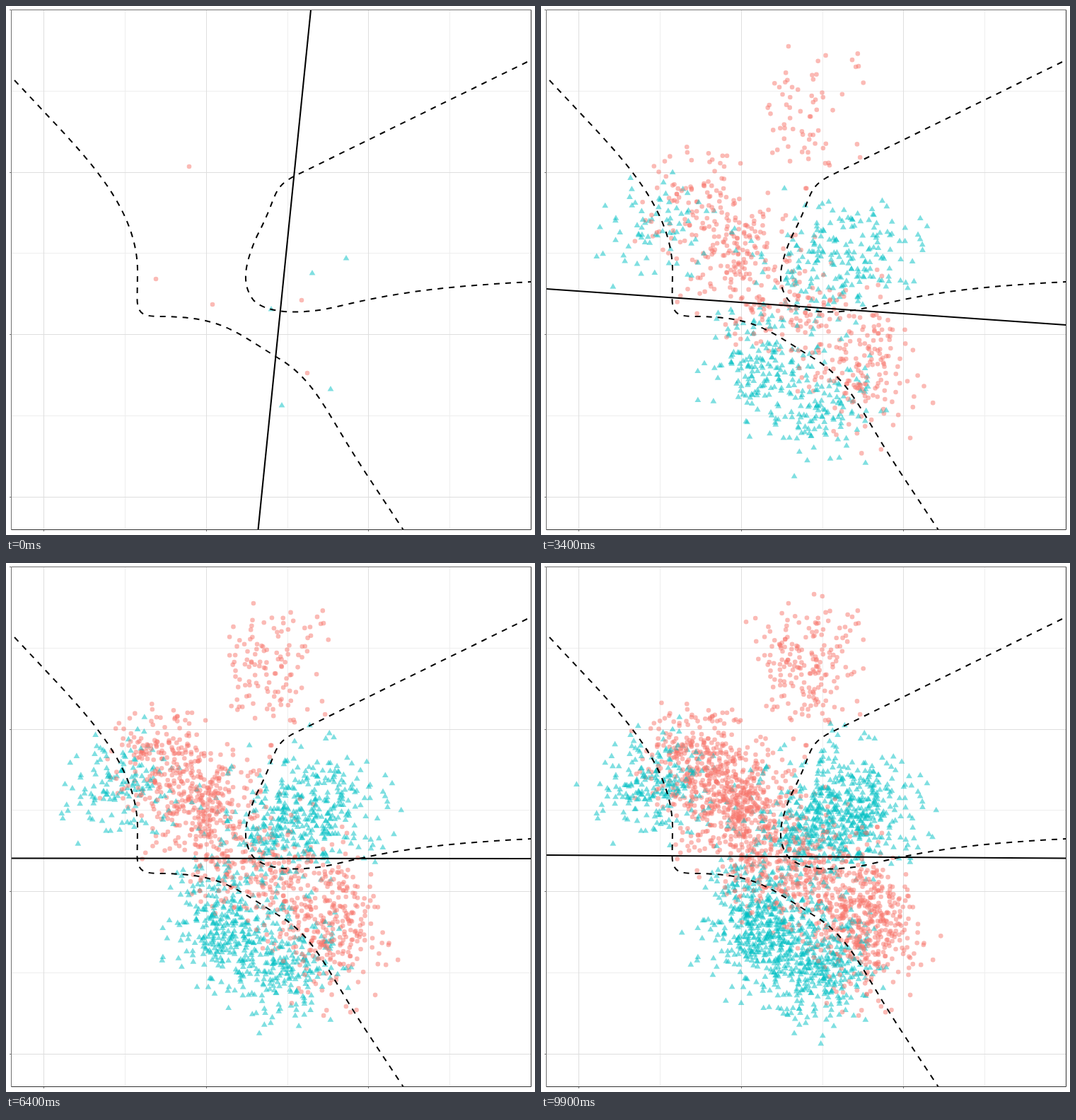
An HTML page with a canvas for the animation above (10 s loop, 748 by 748 pixels).

```html
<!DOCTYPE html>
<html lang="en">
<head>
<meta charset="utf-8">
<title>Growing sample and decision boundaries</title>
<style>
  html, body { margin: 0; width: 100%; height: 100%; overflow: hidden; background: #fff; }
  canvas { display: block; width: 748px; height: 748px; }
</style>
</head>
<body>
<canvas id="plot" width="748" height="748"></canvas>
<script>
const ctx = document.getElementById('plot').getContext('2d');
const STEPS = 100, STEP_MS = 100, PER_STEP = 34, MAX_SPREAD = 2.8;
const LEFT = 7.5, TOP = 5.5, RIGHT = 742.5, BOTTOM = 740.5;
const RED = 'rgba(248,118,109,0.5)', TEAL = 'rgba(0,191,196,0.5)';

// Normal clusters: centre x, y, spread x, y, share
const clusters = [
  [drawCircle, 372, 143, 36, 41, 0.06],
  [drawCircle, 217, 278, 35, 38, 0.10],
  [drawCircle, 285, 343, 43, 42, 0.165],
  [drawCircle, 365, 437, 48, 40, 0.115],
  [drawCircle, 460, 508, 38, 48, 0.13],
  [drawTriangle, 165, 318, 41, 37, 0.07],
  [drawTriangle, 430, 352, 46, 45, 0.145],
  [drawTriangle, 360, 390, 40, 42, 0.05],
  [drawTriangle, 305, 510, 38, 43, 0.12],
  [drawTriangle, 385, 560, 41, 43, 0.13]
];

const firstCircles = [[259, 227], [212, 386], [292, 422], [418, 416], [426, 519]];
const firstTriangles = [[481, 357], [433, 378], [375, 429], [459, 542], [390, 565]];

// Fitted line: step, height at the left edge, height at the right edge
const fitKeys = [[1, 352, 496], [20, 388, 462], [34, 400, 451],
                 [45, 413, 423.5], [64, 417.5, 418], [80, 412.5, 423.5], [99, 413, 417.5]];

const boundaries = [
  `M12 105 L57 153 C120 220 186 290 186 375 L185.5 412 C185 436 195 438.5 215 439
   C300 439 318 456 382 496 C440 530 450 572 513 667 L562 741`,
  `M737 79 L513 189 L407 241 C375 258 385 268 355 325 C335 370 334 395 350 416
   C364 432 410 440 475 423.5 C560 403 630 396 742 390`
].map(d => new Path2D(d));

function makeRandom(seed) {
  return () => {
    seed = (seed + 0x6D2B79F5) | 0;
    let v = Math.imul(seed ^ (seed >>> 15), 1 | seed);
    v = (v + Math.imul(v ^ (v >>> 7), 61 | v)) ^ v;
    return ((v ^ (v >>> 14)) >>> 0) / 4294967296;
  };
}

function buildPoints() {
  const random = makeRandom(27);
  const total = clusters.reduce((sum, c) => sum + c[5], 0);
  const points = [
    ...firstCircles.map(([x, y]) => ({ draw: drawCircle, x, y })),
    ...firstTriangles.map(([x, y]) => ({ draw: drawTriangle, x, y }))
  ];
  for (let i = 0; i < PER_STEP * (STEPS - 1); i++) {
    let pick = random() * total;
    const [draw, cx, cy, sx, sy] = clusters.find(c => (pick -= c[5]) < 0) || clusters[0];
    const radius = Math.min(MAX_SPREAD, Math.sqrt(-2 * Math.log(1 - random())));
    const angle = random() * 2 * Math.PI;
    points.push({
      draw,
      x: cx + sx * radius * Math.cos(angle),
      y: cy + sy * radius * Math.sin(angle)
    });
  }
  return points;
}

function drawCircle(x, y) {
  ctx.fillStyle = RED;
  ctx.beginPath();
  ctx.arc(x, y, 3.3, 0, 2 * Math.PI);
  ctx.fill();
}

function drawTriangle(x, y) {
  ctx.fillStyle = TEAL;
  ctx.beginPath();
  ctx.moveTo(x, y - 5);
  ctx.lineTo(x + 4.4, y + 2.6);
  ctx.lineTo(x - 4.4, y + 2.6);
  ctx.fill();
}

function line(x1, y1, x2, y2, color, width = 1) {
  ctx.strokeStyle = color;
  ctx.lineWidth = width;
  ctx.beginPath();
  ctx.moveTo(x1, y1);
  ctx.lineTo(x2, y2);
  ctx.stroke();
}

const majorX = [53.5, 283.5, 512.5], majorY = [235.5, 464.5, 694.5];

function drawGrid() {
  const grid = (xs, ys, color) => {
    xs.forEach(x => line(x, TOP, x, BOTTOM, color));
    ys.forEach(y => line(LEFT, y, RIGHT, y, color));
  };
  grid(majorX.map(x => x + 115), majorY.map(y => y - 115), '#eeeeee');
  grid(majorX, majorY, '#dedede');
}

function drawFit(step) {
  if (step === 0) return line(431, TOP, 356.5, BOTTOM, '#000', 2.1);
  const i = Math.max(1, fitKeys.findIndex(key => key[0] >= step));
  const a = fitKeys[i - 1], b = fitKeys[i];
  const f = (step - a[0]) / (b[0] - a[0]);
  const at = k => a[k] + (b[k] - a[k]) * f;
  line(LEFT, at(1), RIGHT, at(2), '#000', 2.1);
}

function drawFrame() {
  line(LEFT, TOP, RIGHT, TOP, '#707070');
  line(LEFT, TOP, LEFT, BOTTOM, '#707070');
  line(RIGHT, TOP, RIGHT, BOTTOM, '#333');
  line(LEFT, BOTTOM, RIGHT, BOTTOM, '#333');
  majorX.forEach(x => line(x, 741, x, 743, '#777'));
  [TOP, ...majorY].forEach(y => line(5, y, 7, y, '#777'));
}

const points = buildPoints();
const firstCount = firstCircles.length + firstTriangles.length;

function render(step) {
  ctx.fillStyle = '#fff';
  ctx.fillRect(0, 0, 748, 748);
  drawGrid();
  ctx.save();
  ctx.beginPath();
  ctx.rect(LEFT, TOP, RIGHT - LEFT, BOTTOM - TOP);
  ctx.clip();
  points.slice(0, firstCount + step * PER_STEP).forEach(p => p.draw(p.x, p.y));
  drawFit(step);
  ctx.lineWidth = 2;
  ctx.setLineDash([8, 8]);
  boundaries.forEach(path => ctx.stroke(path));
  ctx.restore();
  drawFrame();
}

const startTime = performance.now();
let shown = -1;
function tick() {
  const step = Math.floor((performance.now() - startTime) / STEP_MS) % STEPS;
  if (step !== shown) render(shown = step);
  requestAnimationFrame(tick);
}
tick();
</script>
</body>
</html>
```
